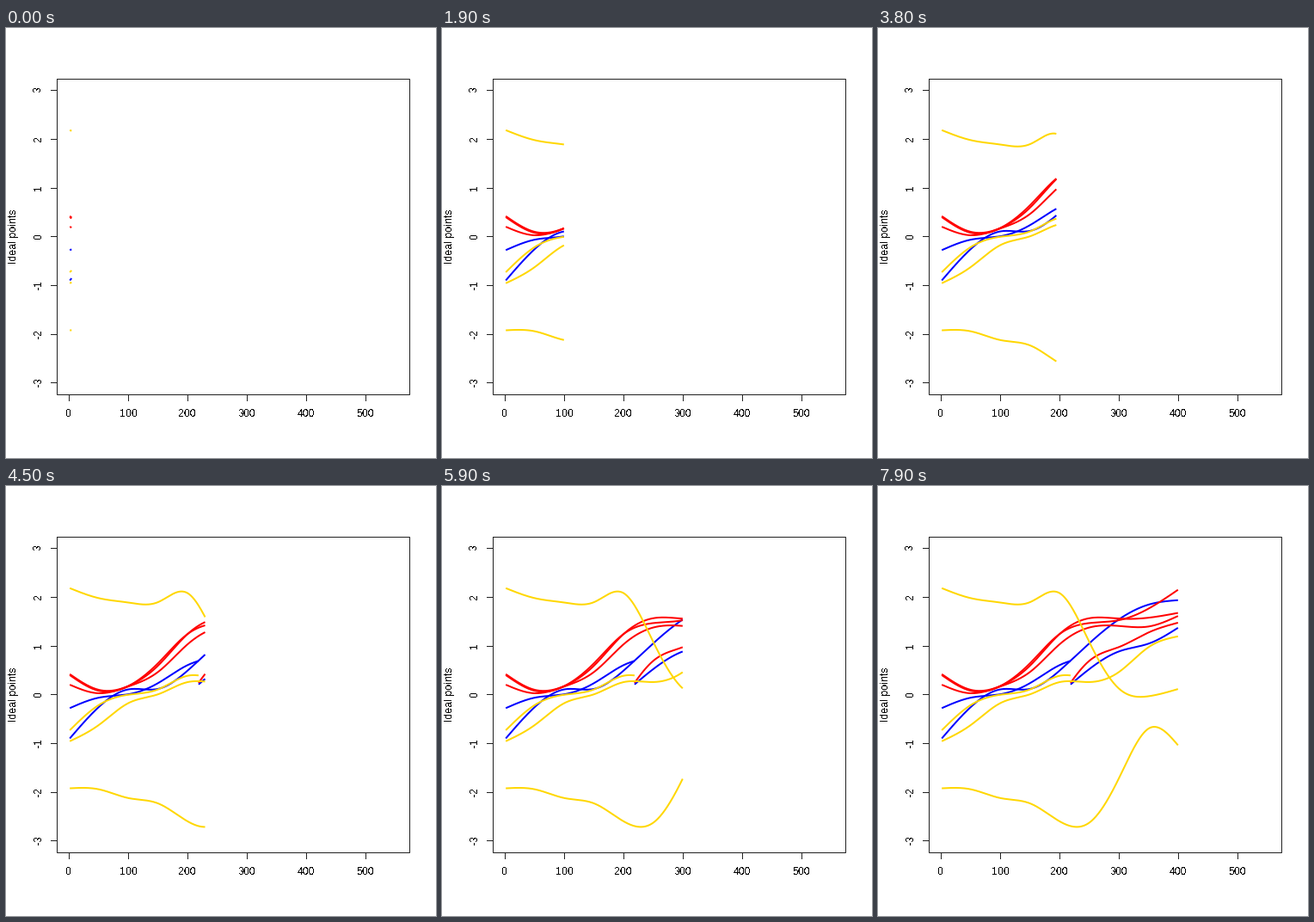
Recreate the animation shown at these times as a matplotlib script. Size 500 by 500 pixels, loop 8000 ms.

```python
import numpy as np
import matplotlib.pyplot as plt
from matplotlib.animation import FuncAnimation

SIZE, DPI = 500, 100
FRAMES, INTERVAL = 80, 100
PT = 72 / DPI          # points per pixel
STEP = 50              # days between key points
BLUE, RED, GOLD = "#0000ff", "#ff0000", "#ffd700"
SWITCH = 218           # day on which two members leave and two join

# Colour, first and last day, key points (one every STEP days)
CURVES = [
    (BLUE, 1, SWITCH, [-.28, -.06, .01, .24, .61, .78]),
    (BLUE, 1, 400, [-.91, -.25, .11, .12, .50, 1.06, 1.55, 1.85, 1.94]),
    (BLUE, SWITCH, 400, [.02, .53, .89, 1.05, 1.38]),
    (RED, 1, 400, [.43, .10, .18, .60, 1.25, 1.57, 1.56, 1.58, 1.68]),
    (RED, 1, 400, [.41, .08, .18, .65, 1.25, 1.47, 1.53, 1.77, 2.16]),
    (RED, 1, 400, [.21, .03, .17, .47, 1.04, 1.38, 1.41, 1.40, 1.62]),
    (RED, SWITCH, 400, [-.08, .70, .98, 1.28, 1.48]),
    (GOLD, 1, 400, [2.19, 1.98, 1.89, 1.90, 2.08, 1.07, .12, -.03, .12]),
    (GOLD, 1, SWITCH, [-.74, -.21, 0, .11, .39, .28]),
    (GOLD, 1, 400, [-.96, -.62, -.17, .01, .26, .26, .47, .98, 1.20]),
    (GOLD, 1, 400, [-1.92, -1.94, -2.12, -2.23, -2.60, -2.62, -1.70, -.69,
                    -1.05]),
]


def px(day):
    return 73.5 + 0.69 * day


def py(point):
    return 242.7 - 56.7 * point


def spline(values, t):
    """Natural cubic spline through unit-spaced values."""
    v = np.asarray(values, float)
    n = len(v)
    a = 4 * np.eye(n) + np.eye(n, k=1) + np.eye(n, k=-1)
    a[0], a[-1] = np.eye(n)[0], np.eye(n)[-1]
    rhs = np.zeros(n)
    rhs[1:-1] = 6 * np.diff(v, 2)
    m = np.linalg.solve(a, rhs)
    i = np.clip(t.astype(int), 0, n - 2)
    q = t - i
    p = 1 - q
    return (p * v[i] + q * v[i + 1]
            + ((p**3 - p) * m[i] + (q**3 - q) * m[i + 1]) / 6)


plt.rcParams.update({"font.family": "Liberation Sans",
                     "font.size": 12.4 * PT,
                     "text.antialiased": False})
fig = plt.figure(figsize=(SIZE / DPI, SIZE / DPI), dpi=DPI, facecolor="white")
ax = fig.add_axes([0, 0, 1, 1])
ax.set(xlim=(0, SIZE), ylim=(SIZE, 0))
ax.axis("off")


def rule(xs, ys):
    # Pixel centres are given directly, so snapping stays off
    ax.plot(xs, ys, color="#222222", lw=PT, snap=False,
            solid_capstyle="projecting", solid_joinstyle="miter", zorder=5)


def label(x, y, text, rotation=0):
    ax.text(x, y, text, rotation=rotation, rotation_mode="anchor",
            ha="center", va="baseline")


LEFT, RIGHT, TOP, BOTTOM = 59.5, 469.5, 59.5, 426.5
TICK = 7
rule([LEFT, RIGHT, RIGHT, LEFT, LEFT], [TOP, TOP, BOTTOM, BOTTOM, TOP])
for day in range(0, 600, 100):
    x = np.floor(px(day)) + 0.5
    rule([x, x], [BOTTOM, BOTTOM + TICK])
    label(x - 0.5, 452, str(day))
for point in range(-3, 4):
    y = np.floor(py(point)) + 0.5
    rule([LEFT - TICK, LEFT], [y, y])
    label(41, y - 1, str(point), 90)
label(12.5, 242, "Ideal points", 90)

paths = []
for color, first, last, keys in CURVES:
    days = np.arange(first, last + 1)
    start = first // STEP * STEP
    points = spline(keys, (days - start) / STEP)
    line, = ax.plot([], [], color=color, lw=2 * PT, solid_capstyle="butt",
                    solid_joinstyle="round")
    paths.append((line, days, px(days), py(points)))


def draw(frame):
    today = 4 + 5 * frame
    for line, days, xs, ys in paths:
        shown = np.count_nonzero(days <= today)
        line.set_data(xs[:shown], ys[:shown])
    return [path[0] for path in paths]


anim = FuncAnimation(fig, draw, frames=FRAMES, interval=INTERVAL,
                     repeat=True, repeat_delay=0, blit=False)
plt.show()
```
